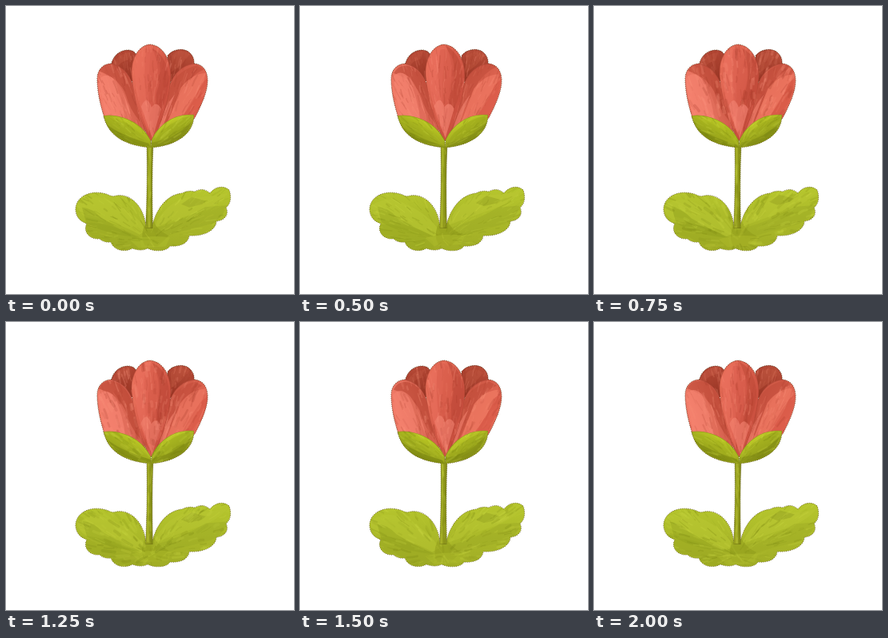
Animation, 360 px wide and 360 px high, one loop 2250 ms. Source, as an HTML page with a canvas:

```html
<!DOCTYPE html>
<html>
<head>
<meta charset="utf-8">
<style>
html, body { margin: 0; width: 100%; height: 100%; overflow: hidden; background: #fff; }
canvas { display: block; width: 360px; height: 360px; }
</style>
</head>
<body>
<canvas id="stage" width="360" height="360"></canvas>
<script>
const ctx = document.getElementById('stage').getContext('2d');
const STEP = 250, POSES = 9;
// brush width of each pose
const BRUSH = [1.7, 1.6, 1.2, 3.6, 2, 3.4, 2.4, 3, 1.8];

// d: outline, box: x y w h, grad: line and colours, aim: point the bristles run to,
// shades: [outline, colour, opacity]
const parts = [
  { d: 'M131 75C133 63 141 55 153 55Q160 55 163 61L166 95L145 92Z',
    box: [130, 54, 36, 42], grad: [140, 54, 155, 92, '#b84b38', '#983524'],
    aim: [181, 210], edge: '#7d2e20', count: 45,
    shades: [['M132 75Q140 59 155 58L152 68Q142 69 137 80Z', '#c75c46', .4]] },
  { d: 'M202 62C209 53 225 51 232 61Q236 66 235 75L215 93L201 95Z',
    box: [200, 52, 36, 44], grad: [222, 53, 206, 92, '#b94e3a', '#983524'],
    aim: [181, 210], edge: '#7d2e20', count: 45,
    shades: [['M207 63Q217 53 229 62L219 74L206 84Z', '#c65b44', .4]] },
  { d: 'M123 140C118 124 114 108 114 91C114 79 122 72 132 72C145 75 154 84 159 99L175 161Z',
    box: [113, 71, 63, 90], grad: [119, 108, 166, 92, '#f17c68', '#c65240'],
    aim: [186, 230], edge: '#a94132', count: 110,
    shades: [
      ['M116 83Q123 70 138 75Q151 80 159 102L168 146Q155 130 151 114Q143 92 116 83Z', '#b94634', .62],
      ['M115 91Q124 79 137 93Q150 110 158 149L124 139Z', '#f58370', .75],
      ['M133 87Q147 101 151 127L161 150L149 144Q147 118 133 87Z', '#d96552', .65]] },
  { d: 'M188 161L203 104C208 84 221 73 236 72C247 73 252 82 252 93C252 108 244 124 236 140Z',
    box: [187, 71, 66, 91], grad: [203, 92, 245, 120, '#ca5542', '#e66b57'],
    aim: [172, 230], edge: '#a94132', count: 110,
    shades: [
      ['M204 100Q213 79 237 73L246 78Q225 87 211 119L198 148L190 159Z', '#bd4a38', .55],
      ['M218 102Q232 84 249 84L246 97Q231 117 220 139L200 149Z', '#ef7963', .75],
      ['M251 91Q251 111 236 139L217 142Q236 119 244 97Z', '#d65644', .65],
      ['M212 111Q203 133 198 149L190 158Q197 128 212 111Z', '#f28270', .65]] },
  { d: 'M180 168C169 148 160 120 157 88C155 66 166 49 180 48C196 49 206 67 206 86C206 112 195 147 183 168Z',
    box: [156, 48, 50, 120], grad: [162, 75, 204, 92, '#e76d58', '#cb5140'],
    aim: [181, 230], edge: '#ab4231', count: 130,
    shades: [
      ['M160 72Q165 52 180 51L177 94L178 158Q159 115 160 72Z', '#e96f5d', .7],
      ['M183 51Q202 61 204 87Q205 107 193 132L184 162Q190 123 188 105Q196 77 183 51Z', '#bd4938', .6],
      ['M174 54Q185 50 190 67Q195 91 185 113L178 139Q169 93 174 54Z', '#d95e4d', .6],
      ['M168 126Q175 110 181 127Q187 118 193 129L182 166Z', '#f18170', .7]] },
  { d: 'M176 174Q180 177 184 174Q182 220 183.5 278L174.5 278Q177 225 176 174Z',
    box: [174, 174, 11, 104], grad: [174, 0, 185, 0, '#a1aa22', '#7d8414'],
    aim: [180, 400], edge: '#696f13', count: 35,
    shades: [['M177 174L180 176L179 277L176 277Z', '#b3bd30', .55]] },
  { d: 'M122 137C135 135 151 139 164 148Q174 155 181 168L181 177C155 175 128 166 122 137Z',
    box: [121, 136, 61, 42], grad: [155, 143, 141, 168, '#bac824', '#858e14'],
    aim: [188, 180], edge: '#7f8517', count: 65,
    shades: [
      ['M123 141Q145 142 162 154Q174 162 179 173Q153 168 132 157Z', '#a4b021', .45],
      ['M125 148Q142 162 179 173L181 177Q144 176 125 148Z', '#7b8511', .65]] },
  { d: 'M235 136C235 161 211 175 181 177L182 167C190 149 210 133 235 136Z',
    box: [180, 135, 56, 42], grad: [203, 143, 216, 166, '#c0cd28', '#89921a'],
    aim: [178, 180], edge: '#7f8517', count: 65,
    shades: [
      ['M231 139Q211 142 192 160L183 173Q214 168 231 144Z', '#9ba81b', .55],
      ['M233 144Q213 166 183 171L182 177Q222 175 233 144Z', '#808a14', .6]] },
  { d: 'M175 276C173 251 156 234 138 237Q133 239 128 236C111 229 87 235 87 255C88 266 95 270 101 272C96 282 104 292 117 291Q122 296 131 295C135 306 149 308 158 303Q169 307 177 303C188 308 202 306 205 300C219 301 228 296 229 287C245 288 262 282 263 269C274 268 279 260 275 252C281 247 282 239 279 230C271 223 260 227 255 234Q246 226 236 232Q227 230 220 234C202 236 189 251 183 274Z',
    box: [87, 225, 194, 81], grad: [180, 231, 180, 306, '#b5c52d', '#a0ac25'],
    aim: [180, 292], edge: '#93a021', count: 260,
    shades: [
      ['M88 248Q111 233 133 247Q161 259 175 282L166 287Q141 272 99 265Q89 260 88 248Z', '#b9c734', .55],
      ['M99 271Q132 270 167 292L169 304Q153 308 134 299L118 290Q101 291 99 271Z', '#99a722', .5],
      ['M96 251Q109 252 120 264L143 277L169 289Q125 285 101 270Z', '#909e1d', .45],
      ['M184 276Q199 244 228 237Q251 238 278 232Q267 247 237 257Q210 266 184 276Z', '#bac735', .5],
      ['M184 278Q218 270 249 251L276 249Q270 269 249 274Q218 281 188 291Z', '#9ba826', .45],
      ['M219 246L232 237L250 242L245 246L229 250Z', '#929f20', .45],
      ['M177 267L184 268Q187 279 203 287L189 300L173 299Q165 284 177 267Z', '#8f9a1a', .55],
      ['M156 292Q180 285 206 289L201 300L167 302Z', '#b0bd2d', .5]] }
].map(p => ({ ...p, path: new Path2D(p.d), shades: p.shades.map(([d, c, a]) => [new Path2D(d), c, a]) }));

function seeded(s) {
  return () => {
    s = (s + 0x6D2B79F5) | 0;
    let t = Math.imul(s ^ (s >>> 15), 1 | s);
    t = (t + Math.imul(t ^ (t >>> 7), 61 | t)) ^ t;
    return ((t ^ (t >>> 14)) >>> 0) / 4294967296;
  };
}

function bristles(part, pose, rnd) {
  const [x, y, w, h] = part.box, red = part.edge > '#9' && part.box[1] < 80 || part.box[1] < 60;
  for (let i = 0; i < part.count; i++) {
    const px = x + rnd() * w, py = y + rnd() * h;
    const a = Math.atan2(part.aim[1] - py, part.aim[0] - px) + (rnd() - .5) * .35;
    const len = 4 + rnd() * 12, dx = Math.cos(a) * len, dy = Math.sin(a) * len;
    const bend = (rnd() - .5) * 3;
    ctx.globalAlpha = .07 + rnd() * .17;
    ctx.strokeStyle = rnd() < .52 ? (red ? '#ff9a83' : '#cedb47') : (red ? '#9e3525' : '#6f7b0d');
    ctx.lineWidth = .5 + rnd() * BRUSH[pose];
    ctx.beginPath();
    ctx.moveTo(px - dx / 2, py - dy / 2);
    ctx.quadraticCurveTo(px + bend, py + bend, px + dx / 2, py + dy / 2);
    ctx.stroke();
  }
}

function paint(part, pose, rnd) {
  const [x0, y0, x1, y1, c0, c1] = part.grad;
  const g = ctx.createLinearGradient(x0, y0, x1, y1);
  g.addColorStop(0, c0);
  g.addColorStop(1, c1);
  ctx.save();
  ctx.clip(part.path);
  ctx.fillStyle = g;
  ctx.fill(part.path);
  ctx.filter = 'blur(0.7px)';
  for (const [path, color, alpha] of part.shades) {
    ctx.save();
    ctx.translate((rnd() - .5) * 3, (rnd() - .5) * 4);
    ctx.globalAlpha = alpha * (.85 + rnd() * .2);
    ctx.fillStyle = color;
    ctx.fill(path);
    ctx.restore();
  }
  ctx.filter = 'none';
  bristles(part, pose, rnd);
  ctx.globalAlpha = .6;
  ctx.strokeStyle = part.edge;
  ctx.lineWidth = 1.3;
  ctx.stroke(part.path);
  ctx.restore();
}

function draw(pose) {
  const rnd = seeded(71 + pose * 997);
  ctx.clearRect(0, 0, 360, 360);
  ctx.lineCap = 'round';
  // grainy rim, covered by the paint on its inner side
  ctx.strokeStyle = '#5f491f';
  ctx.lineWidth = 1;
  ctx.lineCap = 'butt';
  ctx.setLineDash([1, 1.5]);
  ctx.lineDashOffset = pose % 3;
  for (const p of parts) ctx.stroke(p.path);
  ctx.setLineDash([]);
  ctx.lineCap = 'round';
  // leaves lie behind the stem
  const leaves = parts[parts.length - 1];
  paint(leaves, pose, rnd);
  for (const p of parts) if (p !== leaves) paint(p, pose, rnd);
}

let shown = -1;
function tick(now) {
  const pose = Math.floor(now / STEP) % POSES;
  if (pose !== shown) draw(shown = pose);
  requestAnimationFrame(tick);
}
tick(0);
</script>
</body>
</html>
```
